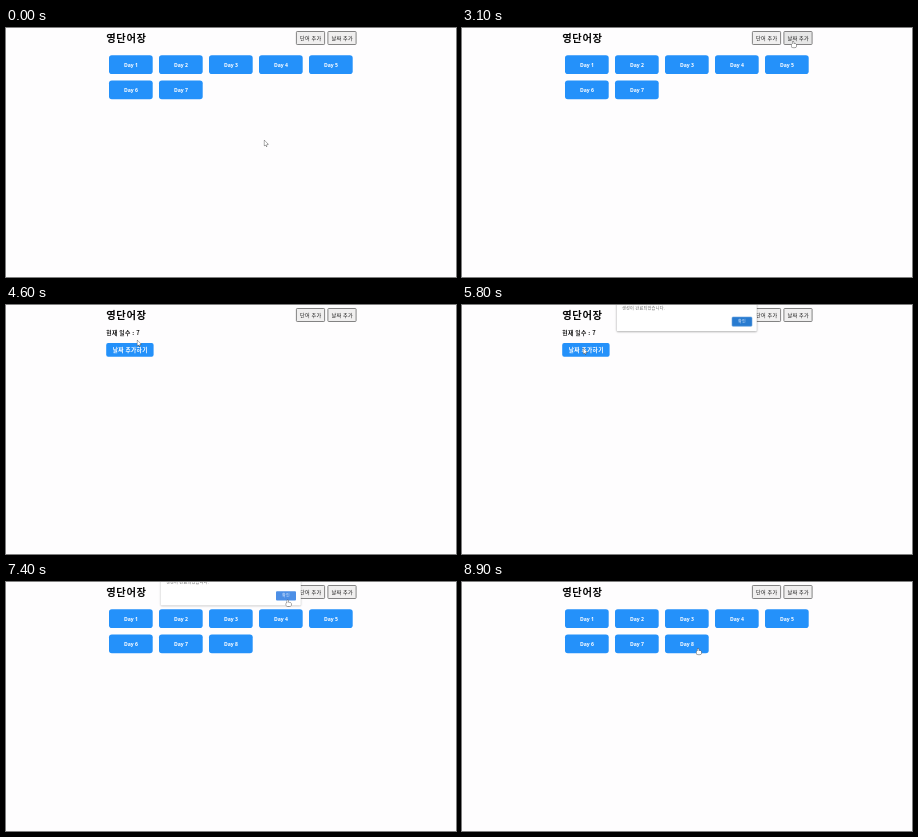
Write an HTML page with a canvas that moves like this. It is 450 px wide and 249 px high and loops after 9 s.

```html
<!DOCTYPE html>
<html lang="ko">
<head>
<meta charset="utf-8">
<title>영단어장</title>
<style>
html, body { margin: 0; width: 100%; height: 100%; overflow: hidden; background: #fefdfe; }
canvas { display: block; width: 450px; height: 249px; }
</style>
</head>
<body>
<canvas id="stage" width="450" height="249"></canvas>
<script>
const ctx = document.getElementById('stage').getContext('2d');
const LOOP = 9000, STEP = 100;
const HANGUL = '"Noto Sans CJK KR", "Noto Sans KR", "Noto Sans CJK", sans-serif';
const LATIN = '"Open Sans", "Noto Sans", sans-serif';
const BLUE = '#2491fa', PAPER = '#fefdfe';

// Page events, in ms
const FORM_AT = 3500, ALERT_AT = 5500, LIST_AT = 7300, ALERT_END = 7600;

const rect = (x, y, w, h) => ({ x, y, w, h });
const tile = i => rect(103 + 50 * (i % 5), 27.2 + 25.3 * Math.floor(i / 5), 43.7, 18.8);
const tiles = n => Array.from({ length: n }, (_, i) => tile(i));
const headButtons = ['단어 추가', '날짜 추가'].map((label, i) =>
  ({ ...rect(290.4 + 31.5 * i, 3.5, 28.2, 13), label }));
const addButton = rect(100.2, 38.1, 47.4, 13.6);
const okButton = dy => rect(270, 12 + dy, 20, 9.3);

// Pointer: where it rests first, then each glide
const REST = { x: 258, y: 112 };
const GLIDES = [
  { from: 800, to: 1200, x: 325, y: 29 },
  { from: 1300, to: 2400, x: 331, y: 13 },
  { from: 3900, to: 4600, x: 131, y: 35 },
  { from: 4600, to: 5000, x: 121, y: 43 },
  { from: 6100, to: 6700, x: 270, y: 22 },
  { from: 6700, to: 7000, x: 281.7, y: 17.7 },
  { from: 7700, to: 8500, x: 236, y: 66 }
];

function pointerAt(t) {
  return GLIDES.reduce((p, g) => {
    const k = Math.min(1, Math.max(0, (t - g.from) / (g.to - g.from)));
    const e = k * k * (3 - 2 * k);
    return { x: p.x + (g.x - p.x) * e, y: p.y + (g.y - p.y) * e };
  }, REST);
}

function inside(p, r) {
  return p.x >= r.x && p.x <= r.x + r.w && p.y >= r.y && p.y <= r.y + r.h;
}

function box(r, radius, fill, stroke, line = 1) {
  ctx.beginPath();
  ctx.roundRect(r.x, r.y, r.w, r.h, radius);
  ctx.fillStyle = fill;
  ctx.fill();
  if (stroke) {
    ctx.strokeStyle = stroke;
    ctx.lineWidth = line;
    ctx.stroke();
  }
}

function text(str, x, y, size, weight, color, align = 'left', family = HANGUL) {
  ctx.font = `${weight} ${size}px ${family}`;
  ctx.letterSpacing = family === HANGUL ? size * 0.06 + 'px' : '0px';
  ctx.textAlign = align;
  ctx.fillStyle = color;
  ctx.fillText(str, x, y);
}

function drawHeader(p, blocked) {
  text('영단어장', 100.2, 14.3, 10.3, 700, '#080808');
  for (const b of headButtons) {
    const hover = !blocked && inside(p, b);
    box(b, 0.8, hover ? '#e6e6e6' : '#f0efef', '#777', 0.9);
    text(b.label, b.x + b.w / 2 + 0.2, 12, 5.1, 500, '#151515', 'center');
  }
}

function drawList(count) {
  tiles(count).forEach((r, i) => {
    box(r, 2.8, BLUE);
    text('Day ' + (i + 1), r.x + 22, r.y + 11.6, 5.1, 700, '#fff', 'center', LATIN);
  });
}

function drawForm() {
  text('현재 일수 : 7', 100.2, 30.2, 5.8, 700, '#151515');
  box(addButton, 2, BLUE);
  text('날짜 추가하기', 124.2, 46.9, 5.7, 700, '#fff', 'center');
}

function drawAlert(dy, closing) {
  ctx.save();
  ctx.shadowColor = `rgba(0,0,0,${closing ? 0.3 : 0.45})`;
  ctx.shadowBlur = 2;
  ctx.shadowOffsetY = 0.5;
  box(rect(154.8, -20, 140, 46.3 + dy), 1, '#fff');
  ctx.restore();
  text('생성이 완료되었습니다.', 160, 4.6 + dy, 4.15, 400, '#666');
  const b = okButton(dy);
  box(b, 1, closing ? '#4c8fe6' : '#287bd0', closing ? null : '#6ba3dd', 0.6);
  text('확인', b.x + 10, b.y + 6.1, 4, 400, '#e8f1ff', 'center');
}

function drawArrow() {
  ctx.beginPath();
  ctx.moveTo(0.4, 0.3);
  ctx.lineTo(0.4, 5.7);
  ctx.lineTo(1.6, 4.7);
  ctx.lineTo(2.6, 6.5);
  ctx.lineTo(2.6, 4.3);
  ctx.lineTo(4.2, 4.2);
  ctx.closePath();
  ctx.stroke();
  ctx.fill();
}

function drawHand() {
  ctx.beginPath();
  ctx.roundRect(-0.5, 0.4, 1.2, 4, 0.6);
  ctx.roundRect(-1.5, 2.8, 4.8, 3.8, 1.3);
  ctx.stroke();
  ctx.fill();
}

function drawPointer(p, active) {
  ctx.save();
  ctx.translate(p.x, p.y);
  ctx.fillStyle = '#fff';
  ctx.strokeStyle = '#444';
  ctx.lineWidth = 0.9;
  ctx.lineJoin = 'round';
  if (active) drawHand();
  else drawArrow();
  ctx.restore();
}

function draw(t) {
  const p = pointerAt(t);
  const form = t >= FORM_AT && t < LIST_AT;
  const alerting = t >= ALERT_AT && t < ALERT_END;
  const closing = t >= LIST_AT;
  const count = closing ? 8 : 7;
  const dy = closing ? -2.8 : 0;

  ctx.fillStyle = PAPER;
  ctx.fillRect(0, 0, 450, 249);
  drawHeader(p, alerting);
  if (form) drawForm();
  else drawList(count);
  if (alerting) drawAlert(dy, closing);

  const page = form ? [addButton] : tiles(count);
  const targets = alerting ? [okButton(dy)] : [...headButtons, ...page];
  drawPointer(p, targets.some(r => inside(p, r)));
}

function tick() {
  const t = performance.now() % LOOP;
  draw(Math.floor(t / STEP) * STEP);
  requestAnimationFrame(tick);
}
tick();
</script>
</body>
</html>
```
